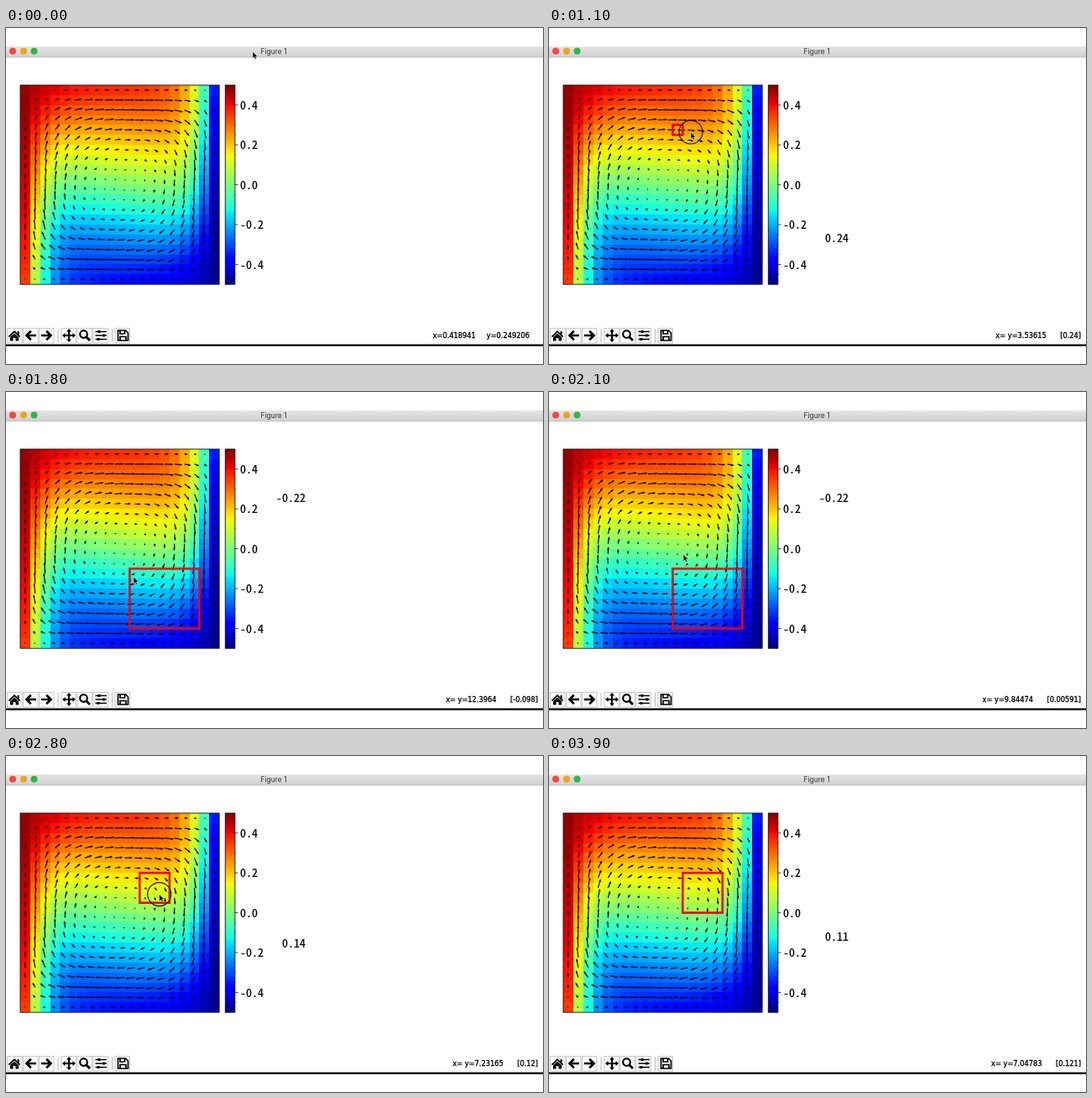
An HTML page that plays this animation: 640 by 400 pixels, repeating every 4 s.

```html
<!DOCTYPE html>
<html lang="en">
<head>
<meta charset="utf-8">
<title>Figure 1</title>
<style>
  html, body { margin: 0; width: 100%; height: 100%; overflow: hidden; background: #fff; }
  svg { display: block; }
  .num { font: 500 14px "Noto Sans Mono CJK JP", "Noto Sans CJK JP", "Liberation Mono", monospace; stroke: #000; stroke-width: .2; }
  .status { font: 8.25px "DejaVu Sans", sans-serif; stroke: #000; stroke-width: .3; }
  .title { font: 8.5px Inter, sans-serif; fill: #333; }
</style>
</head>
<body>
<svg id="stage" width="640" height="400" viewBox="0 0 640 400">
  <defs>
    <linearGradient id="bar" x2="0" y2="1">
      <stop stop-color="#e4e4e4"/><stop offset="1" stop-color="#cfcfcf"/>
    </linearGradient>
    <linearGradient id="scale" x2="0" y2="1"></linearGradient>
  </defs>
  <rect y="22" width="640" height="13" fill="url(#bar)"/>
  <path d="M0 35H640" stroke="#bbb" stroke-width=".6"/>
  <circle cx="8" cy="27.600" r="4" fill="#f4473f"/>
  <circle cx="21" cy="27.600" r="4" fill="#eaa41e"/>
  <circle cx="33.500" cy="27.600" r="4" fill="#2fb644"/>
  <text class="title" x="319" y="31" text-anchor="middle">Figure 1</text>

  <g id="cells" shape-rendering="crispEdges"></g>
  <path id="arrows"/>
  <g id="legend"></g>

  <g fill="none" stroke="#000">
    <g id="boxes" stroke="#bbb" stroke-width=".8"></g>
    <path d="M62 358V375M126.500 358V375" stroke="#aaa" stroke-width=".8"/>
    <path d="M2.800 367L10 360 17.200 367 16 368.200 10 362.500 4 368.200ZM13.600 361H15.600V365L13.600 363.500ZM5 368L10 363.500 15 368V372.500H11.500V369H8.500V372.500H5Z" fill="#000" stroke="none"/>
    <path d="M36 366H25M29.800 360.700L24.500 366 29.800 371.300M42 366H53M48.200 360.700L53.500 366 48.200 371.300" stroke-width="2.700"/>
    <path d="M68.500 366H81.500M75 359.500V372.500" stroke-width="2"/>
    <path d="M67 366l3.500-3v6zM83 366l-3.500-3v6zM75 358l-3 3.500h6zM75 374l-3-3.500h6z" fill="#000" stroke="none"/>
    <circle cx="92.500" cy="364.500" r="4.300" stroke-width="2.200"/>
    <path d="M95.700 367.700L100 372" stroke-width="3"/>
    <path d="M106.500 361.500H120M106.500 366H120M106.500 370.500H120" stroke-width="1.500"/>
    <path d="M111 360V363M116.500 364.500V367.500M110 369V372" stroke-width="2.800"/>
    <path d="M133.500 360H142.500L145.500 363V372H133.500ZM136 360V364H141.500V360M136 372V367.500H143V372" stroke-width="1.700"/>
  </g>
  <rect y="376.500" width="640" height="2.300" fill="#0a0a0a"/>

  <rect id="sel" fill="none" stroke="#f00010" stroke-width="2.600"/>
  <text id="mean" class="num" x="357" text-anchor="end"></text>
  <text id="pos" class="status" y="368.500" text-anchor="end"></text>
  <text id="val" class="status" y="368.500" text-anchor="end"></text>
  <circle id="press" r="14" fill="none" stroke="#111" stroke-width="1.100"/>
  <path id="ptr" d="M0 0V8.300L1.900 6.600 3.200 9.300 4.600 8.600 3.400 6.100H5.900Z" stroke="#fff" stroke-width=".5"/>
</svg>
<script>
const N = 20, X = 17, Y = 68, CELL = 11.86, SIZE = N * CELL, LOOP = 4000;
const $ = id => document.getElementById(id);
const set = (el, attrs) => { for (const k in attrs) el.setAttribute(k, attrs[k]); return el; };
const add = (parent, tag, attrs) =>
  parent.appendChild(set(document.createElementNS("http://www.w3.org/2000/svg", tag), attrs));
const clamp = v => Math.min(1, Math.max(0, v));
const mix = (a, b, k) => a + (b - a) * k;

// Jet colour map, value from -0.5 to 0.5; each channel is a trapezoid
const hump = (v, up, full, fall, end) => 255 * clamp(Math.min((v - up) / (full - up), (end - v) / (end - fall)));
function jet(value) {
  const v = clamp(value + .5);
  return `rgb(${hump(v, .35, .66, .89, 1.11)},${hump(v, .125, .375, .64, .91)},${hump(v, -.11, .11, .34, .65)})`;
}

// Temperature: layered core plus a hot left and a cold right boundary layer
function wall(c, r) {
  const top = Math.exp(-r / 2.2), bottom = Math.exp((r - N + 1) / 4);
  return Math.exp(-Math.pow((c + .5) / (2 + 2.8 * top), 1.45 - .55 * top - .25 * bottom));
}
function heat(c, r) {
  const y = 9.5 - r;
  const core = .047 * y * (1 - .00266 * y * y) + .007 * (c - 9.5) * Math.sin(Math.PI * (r + .5) / N);
  return core + (.5 - core) * wall(c, r) - (.5 + core) * wall(N - 1 - c, N - 1 - r);
}

// Flow: derivatives of a stream function
const layer = (d, a) => 1 - (1 + d / a) * Math.exp(-d / a);
const stream = (x, y) => layer(x, .115 - .045 * y) * layer(1 - x, .07 + .045 * y)
  * layer(y, .12) * layer(1 - y, .12);

function arrow(c, r) {
  const x = (c + .5) / N, y = (r + .5) / N, e = .001;
  const u = stream(x, y + e) - stream(x, y - e);
  const v = stream(x - e, y) - stream(x + e, y);
  const speed = Math.hypot(u, v) || e, len = Math.max(2, speed / e * 2.2);
  const cos = u / speed, sin = v / speed, head = Math.min(3.4, len);
  const half = Math.max(.8, .4 * head), neck = len - head;
  const at = (a, b) =>
    `${(X + x * SIZE + a * cos - b * sin).toFixed(2)} ${(Y + y * SIZE + a * sin + b * cos).toFixed(2)}`;
  return "M" + [at(0, -.6), at(neck, -.6), at(neck, -half), at(len, 0),
    at(neck, half), at(neck, .6), at(0, .6)].join("L") + "Z";
}

function drawPlot() {
  let arrows = "";
  for (let r = 0; r < N; r++) for (let c = 0; c < N; c++) {
    add($("cells"), "rect", { x: X + c * CELL, y: Y + r * CELL, width: CELL + .1, height: CELL + .1, fill: jet(heat(c, r)) });
    arrows += arrow(c, r);
  }
  set($("arrows"), { d: arrows });

  const frame = { y: Y, height: SIZE, fill: "none", stroke: "#111", "stroke-width": .9 };
  add($("legend"), "rect", { ...frame, x: X, width: SIZE });
  for (let i = 0; i <= 100; i++) add($("scale"), "stop", { offset: i / 100, "stop-color": jet(.5 - i / 100) });
  add($("legend"), "rect", { ...frame, x: 261.3, width: 11.6, fill: "url(#scale)" });
  for (let i = -9; i <= 9; i++) {
    const y = Y + SIZE / 2 - i * SIZE / N, major = i % 4 === 0;
    add($("legend"), "path", { d: `M273 ${y}h${major ? 3.5 : 1.5}`, stroke: "#111", "stroke-width": major ? .8 : .4 });
    if (major) add($("legend"), "text", { class: "num", x: 279, y: y + 5.2 }).textContent = (i / N).toFixed(1);
  }
  for (let i = 0; i < 7; i++)
    add($("boxes"), "rect", { x: 1.5 + 19 * i + 7.5 * (i > 2) + 7 * (i > 5), y: 357.5, width: 17.5, height: 17.5 });
}

// Pointer stops, with the tracked row and value in the status line
const stops = [
  { t: 0, x: 294, y: 28, row: 0, val: .3 },
  { t: 300, x: 129, y: 168, row: 8, val: .064 },
  { t: 500, x: 145, y: 155, row: 7.53406, val: .0714 },
  { t: 1100, x: 169, y: 124, row: 3.53615, val: .24 },
  { t: 1400, x: 224, y: 275, row: 17, val: -.37 },
  { t: 1800, x: 152, y: 220, row: 12.3964, val: -.098 },
  { t: 2500, x: 172.5, y: 152, row: 5.91329, val: .166 },
  { t: 3200, x: 198.5, y: 184, row: 9.26289, val: .0502 },
  { t: 3800, x: 206, y: 157, row: 7.04783, val: .121 }
];
// Clicks and drags over cells; a selection stays until the next one
const picks = [
  { t: 300, drag: 0, from: [9, 8], to: [9, 8], mean: .064 },
  { t: 1000, drag: 0, from: [11, 4], to: [11, 4], mean: .24 },
  { t: 1400, drag: 400, from: [17, 17], to: [11, 12], mean: -.22 },
  { t: 2500, drag: 600, from: [12, 6], to: [15, 9], mean: .11 }
];

const ease = k => k * k * (3 - 2 * k);
const last = (list, t) => list.filter(s => s.t <= t).pop();
const show = (id, on) => set($(id), { visibility: on ? "visible" : "hidden" });
const digits = (v, n) => String(+v.toPrecision(n));

function pointer(t) {
  const a = last(stops, t), b = stops[stops.indexOf(a) + 1] || a;
  const k = a === b ? 0 : ease((t - a.t) / (b.t - a.t));
  return Object.fromEntries(Object.keys(a).map(key => [key, mix(a[key], b[key], k)]));
}

function drawPick(t) {
  const p = last(picks, t);
  show("sel", p);
  $("mean").textContent = "";
  if (!p) return false;
  const k = p.drag ? ease(clamp((t - p.t) / p.drag)) : 1;
  const end = p.from.map((v, i) => Math.round(mix(v, p.to[i], k)));
  const [c, r] = end.map((v, i) => Math.min(v, p.from[i]));
  const [w, h] = end.map((v, i) => Math.abs(v - p.from[i]) + 1);
  const mean = mix(heat(...p.from), p.mean, k);
  set($("sel"), { x: X + c * CELL, y: Y + r * CELL, width: w * CELL, height: h * CELL });
  set($("mean"), { y: 190 + 270 * mean }).textContent = digits(mean, 2);
  return t < p.t + Math.max(200, p.drag);
}

function draw(ms) {
  const t = Math.floor(ms % LOOP / 100) * 100;
  const { x, y, row, val } = pointer(t);
  const inside = x < X + SIZE && y > Y;

  set($("ptr"), { transform: `translate(${x} ${y})` });
  set($("press"), { cx: x, cy: y });
  show("ptr", t < 3700);
  show("press", drawPick(t));

  $("val").textContent = inside ? `[${digits(val, 3)}]` : "y=0.249206";
  $("pos").textContent = inside ? `x= y=${row.toPrecision(6)}` : "x=0.418941";
  const right = inside ? 634 : 624;
  set($("val"), { x: right });
  set($("pos"), { x: right - $("val").getComputedTextLength() - (inside ? 16.5 : 13) });
}

drawPlot();
const start = performance.now();
function tick(now) {
  draw(Math.max(0, now - start));
  requestAnimationFrame(tick);
}
draw(0);
requestAnimationFrame(tick);
</script>
</body>
</html>
```
